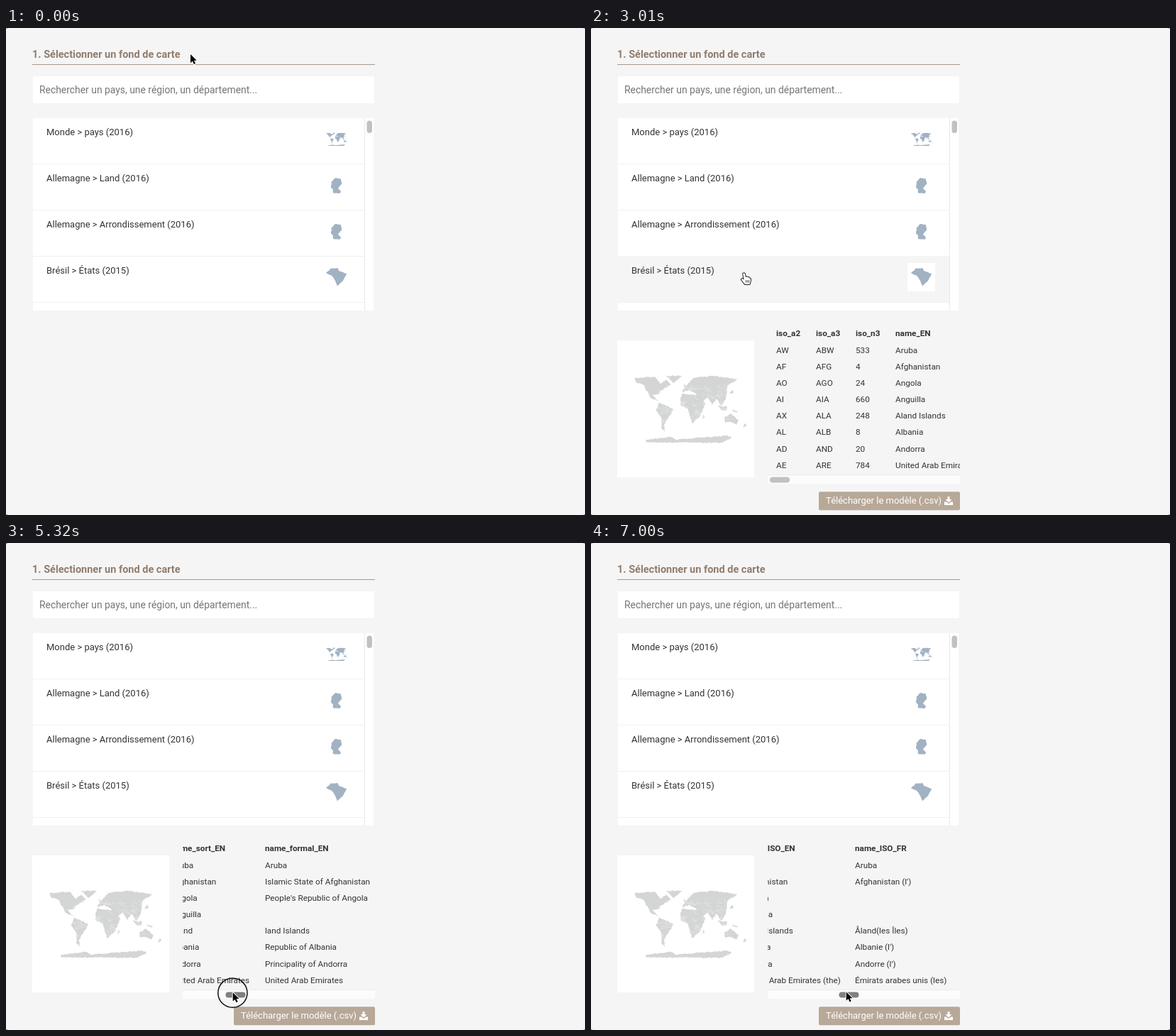
These frames come from a looping animation (816x686 px, 7070 ms). An HTML page with a canvas:

```html
<!DOCTYPE html>
<html lang="fr">
<head>
<meta charset="utf-8">
<title>Fond de carte</title>
<style>
html, body { margin: 0; width: 100%; height: 100%; overflow: hidden; background: #f5f5f5; }
canvas { display: block; }
</style>
</head>
<body>
<canvas id="stage" width="816" height="686"></canvas>
<script>
const ctx = document.getElementById('stage').getContext('2d');
const LOOP = 7070, STEP = 70;
const PAGE = '#f5f5f5', DARK = '#333', BLUE = '#a1b2c3', BROWN = '#b8a898';
const LIST_TOP = 127, ROW = 64.8;
const PANEL_AT = 1610, CLICK = [1330, 1540], DRAG = [4130, 6860];

const rows = ['Monde > pays (2016)', 'Allemagne > Land (2016)',
  'Allemagne > Arrondissement (2016)', 'Brésil > États (2015)'];

const names = ['Aruba', 'Afghanistan', 'Angola', 'Anguilla', 'Aland Islands', 'Albania', 'Andorra', 'United Arab Emirates'];
const shortNames = names.map(n => n.replace(' Islands', ''));
const isoNames = names.map(n => n.replace('Aland', 'Åland').replace('Emirates', 'Emirates (the)'));
const columns = [
  [261, 'iso_a2', ['AW', 'AF', 'AO', 'AI', 'AX', 'AL', 'AD', 'AE']],
  [317, 'iso_a3', ['ABW', 'AFG', 'AGO', 'AIA', 'ALA', 'ALB', 'AND', 'ARE']],
  [373, 'iso_n3', ['533', '4', '24', '660', '248', '8', '20', '784']],
  [429, 'name_EN', names],
  [561, 'name_short_EN', shortNames],
  [693, 'name_sort_EN', shortNames],
  [825, 'name_formal_EN', ['Aruba', 'Islamic State of Afghanistan', "People's Republic of Angola", '',
    'land Islands', 'Republic of Albania', 'Principality of Andorra', 'United Arab Emirates']],
  [994, 'name_ISO_EN', isoNames],
  [1152, 'name_ISO_FR', ['Aruba', "Afghanistan (l')", '', '', 'Åland(les Îles)', "Albanie (l')",
    "Andorre (l')", 'Émirats arabes unis (les)']]
];

function seeded(seed) {
  return () => (seed = (seed * 16807) % 2147483647) / 2147483647;
}

// Closed outline through a few corners, with a ragged shore between them
function coast(corners, rough = .8) {
  const path = new Path2D(), random = seeded(corners.length * 97);
  for (let i = 0; i < corners.length; i += 2) {
    const [x0, y0] = corners.slice(i, i + 2);
    const [x1, y1] = [...corners, ...corners].slice(i + 2, i + 4);
    const parts = Math.ceil(Math.hypot(x1 - x0, y1 - y0) / 2.5);
    for (let p = 0; p < parts; p++) {
      const u = p / parts, jitter = () => p ? (random() - .5) * 2 * rough : 0;
      path.lineTo(x0 + (x1 - x0) * u + jitter(), y0 + (y1 - y0) * u + jitter());
    }
  }
  path.closePath();
  return path;
}

const lands = {
  northAmerica: [2, 4, 30, 2, 38, 12, 46, 6, 53, 13, 38, 22, 35, 27, 26, 27, 35, 37, 24, 32, 15, 15, 3, 9],
  greenland: [46, 1, 68, 1, 56, 11],
  southAmerica: [36, 38, 56, 48, 43, 70, 44, 80, 39, 74, 39, 60, 32, 50],
  africa: [69, 26, 88, 28, 101, 39, 94, 58, 83, 68, 77, 48, 66, 42, 66, 33],
  eurasia: [69, 24, 72, 16, 84, 4, 112, 1, 147, 6, 133, 14, 130, 33, 124, 44, 117, 33, 111, 42, 105, 31, 95, 39, 88, 26, 78, 21],
  britain: [71, 11, 74, 16, 71, 16],
  japan: [140, 20, 141, 24, 134, 28],
  madagascar: [99, 55, 100, 58, 97, 63],
  indonesia: [119, 43, 132, 44, 130, 50, 125, 50],
  papua: [138, 47, 147, 52, 140, 51],
  australia: [128, 60, 137, 54, 148, 63, 145, 70, 137, 66, 129, 67],
  newZealand: [157, 67, 159, 70, 154, 76],
  antarctica: [17, 91, 52, 87, 60, 91, 132, 85, 138, 88, 126, 95, 17, 95]
};
const world = new Path2D();
Object.values(lands).forEach(corners => world.addPath(coast(corners)));
const germany = coast([7, 1, 15, 2, 16, 10, 11, 15, 15, 20, 13, 23, 4, 22, 4, 17, 1, 14, 2, 6], .4);
const brazil = coast([6, 2, 16, 1, 18, 5, 29, 9, 24, 19, 16, 27, 13, 19, 9, 13, 0, 8, 5, 4], .4);
const arrow = new Path2D('M0 0V12.2L2.8 9.6 4.9 14 7 13 5 8.8H8.8Z');
const hand = new Path2D('M-1.4 1Q0-.8 1.4 1L2.4 5.8Q6 4.5 9.4 8.4V11L8 16H1.5L-3.8 9.4Q-3.4 7.4-1.4 8.4L.1 9.6Z');

const cursorKeys = [[490, 260, 37], [1260, 188, 167], [2450, 188, 167], [3780, 260, 632.5]];
const scrollKeys = [[4130, 0], [4690, 222], [5320, 460], [5810, 598], [6650, 780]];
const linear = u => u;
const smooth = u => u * u * (3 - 2 * u);

// Values between timed keys, held before the first and after the last
function tween(keys, t, ease) {
  const next = keys.findIndex(k => k[0] > t);
  if (next <= 0) return keys.at(next).slice(1);
  const a = keys[next - 1], b = keys[next];
  const u = ease((t - a[0]) / (b[0] - a[0]));
  return a.map((v, i) => v + (b[i] - v) * u).slice(1);
}

function rect(x, y, w, h, color) {
  ctx.fillStyle = color;
  ctx.fillRect(x, y, w, h);
}

function pill(x, y, w, h, r, color) {
  ctx.fillStyle = color;
  ctx.beginPath();
  ctx.roundRect(x, y, w, h, r);
  ctx.fill();
}

function text(str, x, y, size, color = DARK, weight = 400) {
  ctx.font = `${weight} ${size}px Roboto, sans-serif`;
  ctx.fillStyle = color;
  ctx.fillText(str, x, y);
}

function at(x, y, scale, draw) {
  ctx.save();
  ctx.translate(x, y);
  ctx.scale(scale, scale);
  draw();
  ctx.restore();
}

function shape(path, x, y, scale, color) {
  at(x, y, scale, () => { ctx.fillStyle = color; ctx.fill(path); });
}

function drawHeader() {
  rect(0, 0, 816, 686, PAGE);
  for (const x of [0, 814]) for (const y of [0, 685]) rect(x, y, 2, 1, '#999');
  text('1. Sélectionner un fond de carte', 37, 42.4, 14.5, '#907c6e', 700);
  rect(37, 51, 483, 1, '#a8998c');
  rect(38, 68, 481, 38, '#fff');
  text('Rechercher un pays, une région, un département...', 47, 92, 13.9, '#757575');
}

function drawList(hover) {
  rect(38, LIST_TOP, 480, 271, '#fff');
  rows.forEach((label, i) => {
    const y = LIST_TOP + i * ROW;
    if (i === hover) {
      rect(38, Math.round(y), 467, 65, PAGE);
      rect(446, Math.round(y) + 10, 39, 40, '#fff');
    }
    rect(38, Math.round(y + ROW - .6), 467, 1, '#f1f1f1');
    text(label, 57, y + 24.2, 13);
    if (i === 0) shape(world, 451, 147.5, .195, BLUE);
    else if (i === 3) shape(brazil, 451, 337, 1, BLUE);
    else shape(germany, 457, y + 18.5, 1, BLUE);
  });
  rect(505, LIST_TOP, 1, 271, '#e8e8e8');
  pill(508.5, 130.5, 7.5, 17.5, 3.75, '#c1c1c1');
}

function drawMap() {
  rect(37, 440, 193, 193, '#fff');
  shape(world, 60, 489, 1, '#d4d5d5');
  at(60, 489, 1, () => {
    const random = seeded(41);
    ctx.clip(world);
    ctx.strokeStyle = '#e9eaea';
    ctx.lineWidth = .6;
    ctx.beginPath();
    for (let i = 0; i < 120; i++) {
      const x = 34 + random() * 100, y = 12 + random() * 52;
      ctx.moveTo(x, y);
      ctx.lineTo(x + random() * 8 - 4, y + 4);
      ctx.lineTo(x + 6, y + random() * 8);
    }
    ctx.stroke();
  });
}

function drawTable(t, scroll) {
  ctx.save();
  ctx.beginPath();
  ctx.rect(249, 415, 271, 230);
  ctx.clip();
  for (const [x, title, cells] of columns) {
    const left = x - scroll;
    text(title, left, 434.4, 11.77, DARK, 700);
    cells.forEach((cell, i) => text(cell, left, 457.6 + i * 23.15, 11.77));
  }
  ctx.restore();
  rect(249, 629, 271, 13, '#fcfcfc');
  rect(249, 629, 271, 1, '#ececec');
  const thumb = t < 3920 ? '#c1c1c1' : t < 4060 ? '#a4a4a4' : '#808080';
  pill(252 + scroll / 8, 632.5, 28, 8, 4, thumb);
}

function drawButton() {
  pill(321, 653.3, 199, 26, 2, BROWN);
  text('Télécharger le modèle (.csv)', 331, 670.4, 13, '#fff');
  ctx.fill(new Path2D('M502.5 660h3v4h3l-4.5 4.6-4.5-4.6h3Z'));
  ctx.fill(new Path2D('M498 667.6h3l3 2.6 3-2.6h3v4.4h-12Z'));
}

function drawCursor(x, y, pointing, pressed) {
  at(x, y, 1, () => {
    ctx.lineJoin = 'round';
    if (pressed) {
      ctx.strokeStyle = '#111';
      ctx.lineWidth = 1.5;
      ctx.beginPath();
      ctx.arc(-.3, .4, 20.6, 0, Math.PI * 2);
      ctx.stroke();
    }
    const path = pointing ? hand : arrow;
    ctx.strokeStyle = pointing ? '#222' : '#fff';
    ctx.lineWidth = 2;
    ctx.stroke(path);
    ctx.fillStyle = pointing ? '#fff' : '#000';
    ctx.fill(path);
    if (pointing) for (const fx of [2.6, 4.6, 6.6]) rect(fx, 10, .8, 3.5, '#222');
  });
}

function render(t) {
  const within = ([a, b]) => t >= a && t < b;
  const [scroll] = tween(scrollKeys, t, linear);
  const [x, y] = t < DRAG[0] ? tween(cursorKeys, t, smooth) : [262.2 + scroll / 8, 634.5 - scroll / 390];
  const row = Math.floor((y - LIST_TOP) / ROW);
  const hover = row < rows.length ? row : -1;
  drawHeader();
  drawList(hover);
  if (t >= PANEL_AT) {
    drawMap();
    drawTable(t, scroll);
    drawButton();
  }
  drawCursor(x, y, hover >= 0, within(CLICK) || within(DRAG));
}

const start = performance.now();
function tick() {
  const t = (performance.now() - start) % LOOP;
  render(Math.floor(t / STEP) * STEP);
  requestAnimationFrame(tick);
}
tick();
</script>
</body>
</html>
```
